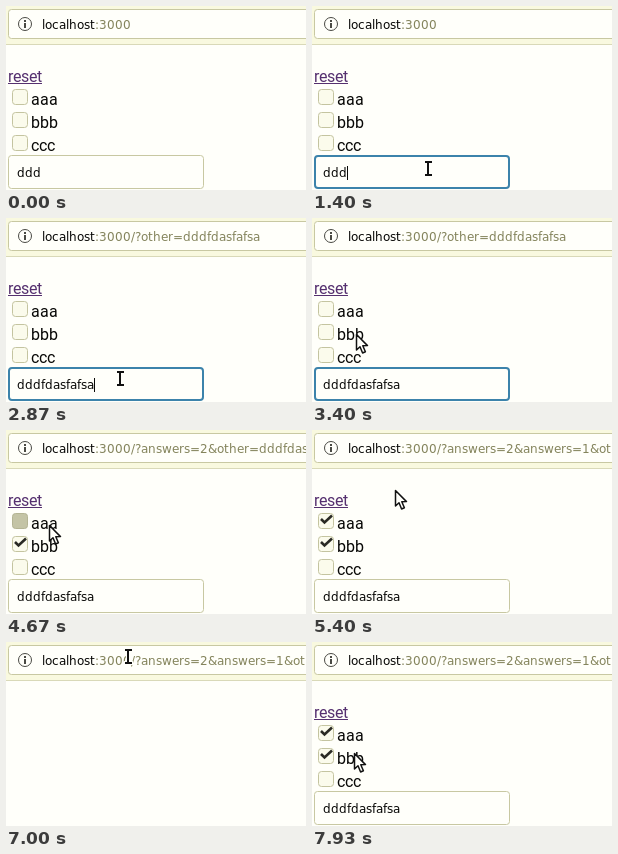
An HTML page with a canvas that plays this animation: 300x184 px, repeating every 8 s.

```html
<!DOCTYPE html>
<html lang="en">
<meta charset="utf-8">
<title>Form state in the URL</title>
<style>
  html, body { margin: 0; width: 100%; height: 100%; overflow: hidden; background: #fffffa; }
  canvas { display: block; }
</style>
<canvas id="stage" width="300" height="184"></canvas>
<script>
const ctx = document.getElementById('stage').getContext('2d');
const FPS = 15, TICKS = 120;
const UI = '12px "DejaVu Sans", sans-serif';
const BODY = '16px Roboto, sans-serif';
const INK = '#080806', DIM = '#84845c', EDGE = '#c8c8a2', BLUE = '#3c83ab', LINK = '#55306f';
const PAGE = '#fffffa', BAR = '#f9f9df', ICON = '#4a4a44';

// All times are in ticks of 1/15 s
const entry = { at: 5, x: 120, y: 172 };
const moves = [
  { from: 5, to: 8, x: 96, y: 162 },
  { from: 18, to: 21, x: 116, y: 162 },
  { from: 42, to: 51, x: 44, y: 116 },
  { from: 60, to: 64, x: 43, y: 95 },
  { from: 70, to: 73, x: 43, y: 106 },
  { from: 76, to: 86, x: 122, y: 14 },
  { from: 113, to: 119, x: 42, y: 111 }
];
const click = { input: 15, bbb: 57, aaa: 70, address: 89 };
const typing = { from: 22, step: 2.05, letters: 'fdasfafsa' };
const reload = 103;

const between = (n, from, to) => n >= from && n < to;

function inputValue(n) {
  const count = Math.floor((n - typing.from) / typing.step) + 1;
  return 'ddd' + typing.letters.slice(0, Math.max(0, count));
}

function query(n) {
  if (n <= typing.from) return '';
  const answers = (n > click.bbb + 2 ? 'answers=2&' : '') + (n > click.aaa + 1 ? 'answers=1&' : '');
  return '/?' + answers + 'other=' + inputValue(n - 1);
}

// Whole-pixel glyph advances, as in hinted desktop text; returns the end x
function text(str, x, y, font, color) {
  ctx.font = font;
  ctx.fillStyle = color;
  for (const ch of str) {
    ctx.fillText(ch, x, y);
    x += Math.round(ctx.measureText(ch).width);
  }
  return x;
}

function rect(x, y, w, h, color) {
  ctx.fillStyle = color;
  ctx.fillRect(x, y, w, h);
}

function stroke(color, width) {
  ctx.strokeStyle = color;
  ctx.lineWidth = width;
  ctx.stroke();
}

function box(x, y, w, h, fill, edge, width = 1) {
  ctx.beginPath();
  ctx.roundRect(x + width / 2, y + width / 2, w - width, h - width, 3);
  ctx.fillStyle = fill;
  ctx.fill();
  stroke(edge, width);
}

function addressBar(n) {
  const focused = between(n, click.address, reload);
  rect(0, 0, 300, 38, BAR);
  rect(0, 38, 300, 1, '#d9d9b8');
  box(2, 3, 310, 30, PAGE, focused ? BLUE : EDGE);
  ctx.beginPath();
  ctx.arc(19, 18, 6.5, 0, 7);
  stroke(ICON, 1);
  rect(18, 14, 2, 2, ICON);
  rect(18, 17, 2, 5, ICON);
  const x = text('localhost', 36, 23, UI, INK);
  const caret = text(':300', x, 23, UI, focused ? INK : DIM);
  text('0' + query(n), caret, 23, UI, focused ? INK : DIM);
  if (focused) rect(caret, 12, 1, 13, INK);
}

function checkbox(label, row, clicked, n) {
  const y = 83 + row * 23, pressed = n === clicked;
  box(6, y, 16, 16, pressed ? '#c4c4a6' : '#fbfbec', pressed ? '#b4b494' : '#c4c4a0');
  if (n > clicked) {
    ctx.beginPath();
    ctx.moveTo(9, y + 6);
    ctx.lineTo(12.5, y + 9.5);
    ctx.lineTo(20, y + 2.5);
    stroke('#2a2a24', 2.6);
  }
  text(label, 25, y + 16, BODY, INK);
}

function form(n) {
  const end = text('reset', 2, 76, BODY, LINK);
  rect(2, 77, end - 2, 1, LINK);
  checkbox('aaa', 0, click.aaa, n);
  checkbox('bbb', 1, click.bbb, n);
  checkbox('ccc', 2, Infinity, n);
  const focused = between(n, click.input, click.bbb);
  box(2, 149, 196, 34, PAGE, focused ? BLUE : EDGE, focused ? 2 : 1);
  const caret = text(inputValue(n), 11, 171, UI, INK);
  if (focused && n < 47) rect(caret, 160, 1, 14, INK);
}

function ibeam(x, y) {
  for (const [pad, color] of [[1, PAGE], [0, '#111']]) {
    const bar = (dx, dy, w, h) => rect(x + dx - pad, y + dy - pad, w + 2 * pad, h + 2 * pad, color);
    bar(-3, -7, 7, 2);
    bar(-1, -6, 2, 13);
    bar(-3, 6, 7, 2);
  }
}

function arrow(x, y) {
  ctx.save();
  ctx.translate(x, y);
  ctx.lineJoin = 'round';
  const shape = new Path2D('M.5 .5V16L4 12.7 6.6 19 9.4 17.8 6.8 11.8 11.5 11.6Z');
  ctx.fillStyle = PAGE;
  ctx.fill(shape);
  ctx.strokeStyle = '#111';
  ctx.lineWidth = 1.5;
  ctx.stroke(shape);
  ctx.restore();
}

function pointer(n) {
  if (n < entry.at) return;
  let { x, y } = entry;
  for (const m of moves) {
    const k = Math.min(1, Math.max(0, (n - m.from) / (m.to - m.from)));
    const eased = k * k * (3 - 2 * k);
    x += (m.x - x) * eased;
    y += (m.y - y) * eased;
  }
  const overField = y < 32 || y > 149;
  (overField ? ibeam : arrow)(Math.round(x), Math.round(y));
}

function draw(now) {
  const n = Math.floor((now + 4) * FPS / 1000) % TICKS;
  rect(0, 0, 300, 184, PAGE);
  addressBar(n);
  if (!between(n, reload + 1, reload + 3)) form(n);
  pointer(n);
}

const start = performance.now();
function loop() {
  draw(performance.now() - start);
  requestAnimationFrame(loop);
}
loop();
</script>
</html>
```
